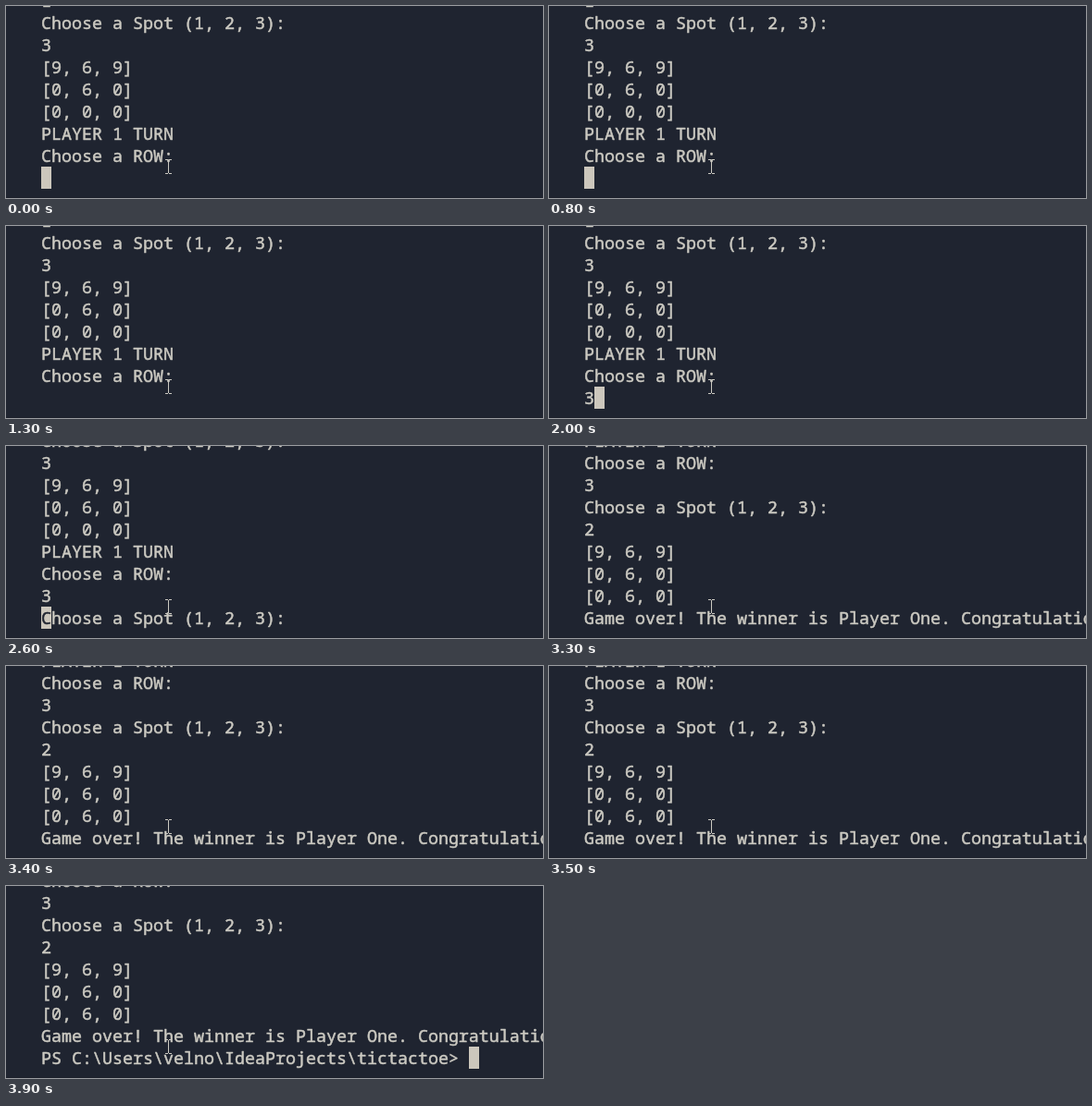
Recreate the animation shown at these times as an HTML page with a canvas. Size 580 px wide and 208 px high, loop 4 s.

```html
<!DOCTYPE html>
<html lang="en">
<head>
<meta charset="utf-8">
<title>Tic-tac-toe in a terminal</title>
<style>
  html, body { margin: 0; width: 100%; height: 100%; overflow: hidden; background: #1f2430; }
  canvas { display: block; }
</style>
</head>
<body>
<canvas id="screen" width="580" height="208"></canvas>
<script>
const ctx = document.getElementById('screen').getContext('2d');
const BACK = '#1f2430', TEXT = '#cccac2', BLOCK = '#ccc7bc';
const LEFT = 38, TOP = 6, CELL = 11, LINE = 24, BASELINE = 19, LAST_ROW = 7;
const LOOP = 4000, HIDDEN = -1;

const lines = [
  '1',
  'Choose a Spot (1, 2, 3):',
  '3',
  '[9, 6, 9]',
  '[0, 6, 0]',
  '[0, 0, 0]',
  'PLAYER 1 TURN',
  'Choose a ROW:',
  '3',
  'Choose a Spot (1, 2, 3):',
  '2',
  '[9, 6, 9]',
  '[0, 6, 0]',
  '[0, 6, 0]',
  'Game over! The winner is Player One. Congratulations!',
  'PS C:\\Users\\velno\\IdeaProjects\\tictactoe> '
];

// start time, bottom line, characters shown on it, cursor column
const steps = [
  [0, 8, 0, 0],
  [100, 8, 0, HIDDEN],
  [700, 8, 0, 0],
  [1200, 8, 0, HIDDEN],
  [1900, 8, 0, 0],
  [2000, 8, 1, 1],
  [2400, 9, 24, 0],
  [2700, 10, 0, 0],
  [3000, 10, 1, 1],
  [3300, 14, 60, HIDDEN],
  [3600, 15, 42, 42]
];

function rect(color, x, y, w, h) {
  ctx.fillStyle = color;
  ctx.fillRect(x, y, w, h);
}

// A thin outline gives the letters a slightly heavier weight.
function print(text, col, row, color) {
  const x = LEFT + col * CELL, y = TOP + row * LINE + BASELINE;
  ctx.fillStyle = ctx.strokeStyle = color;
  ctx.fillText(text, x, y);
  ctx.strokeText(text, x, y);
}

function drawPointer() {
  rect(TEXT, 175, 167, 1, 14);
  for (const y of [166, 181]) {
    rect(TEXT, 172, y, 3, 1);
    rect(TEXT, 176, y, 3, 1);
  }
}

function draw(time) {
  const [, bottom, shown, cursor] = steps.findLast(step => step[0] <= time);
  rect(BACK, 0, 0, 580, 208);
  rect('#1b1f2a', 0, 207, 580, 1);
  ctx.font = '18.333px "Noto Sans Mono", monospace';
  ctx.lineWidth = 0.5;
  ctx.lineJoin = 'round';
  for (let i = Math.max(0, bottom - LAST_ROW - 1); i <= bottom; i++) {
    const text = i < bottom ? lines[i] : lines[i].slice(0, shown);
    print(text, 0, i - bottom + LAST_ROW, TEXT);
  }
  if (cursor !== HIDDEN) {
    rect(BLOCK, LEFT + cursor * CELL, TOP + LAST_ROW * LINE, CELL, LINE);
    if (cursor < shown) print(lines[bottom][cursor], cursor, LAST_ROW, BACK);
  }
  drawPointer();
}

function tick() {
  draw(performance.now() % LOOP);
  requestAnimationFrame(tick);
}
tick();
</script>
</body>
</html>
```
